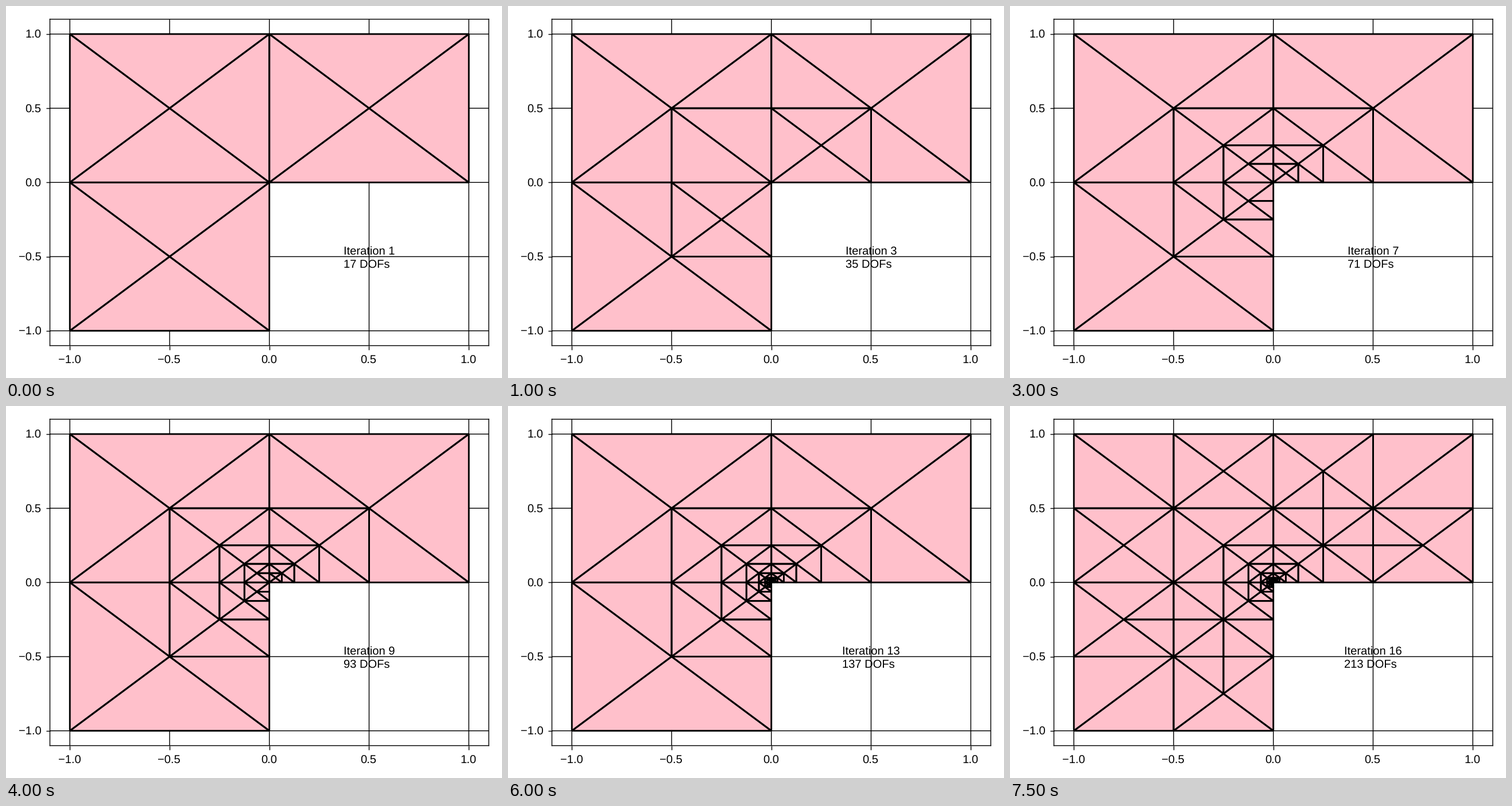
Write a matplotlib script that moves like this. It is 864 by 648 pixels and loops after 8 s.

```python
"""Adaptive refinement of an L-shaped mesh by newest vertex bisection."""
import matplotlib.pyplot as plt
from matplotlib.animation import FuncAnimation
from matplotlib.collections import PolyCollection

W, H = 864, 648
LEFT, RIGHT, TOP, BOTTOM = 76.5, 840.96, 23.04, 591.6
LIM = 1.1
FONT = 20.16
THIN, THICK = 1.44, 2.88
STEP_MS = 500

plt.rcParams.update({
    "font.family": "Liberation Sans",
    "font.size": FONT,
    "text.hinting": "no_hinting",
    "path.snap": False,
})

DIRS = {
    "L": (-1, 0), "R": (1, 0), "U": (0, 1), "D": (0, -1),
    "A": (1, 1), "B": (-1, 1), "C": (-1, -1),
}


def near(code):
    """Edge midpoints around the corner: 'L1' is direction L at distance 2**-1."""
    return [(DIRS[c[0]][0] / 2 ** int(c[1]), DIRS[c[0]][1] / 2 ** int(c[1]))
            for c in code.split()]


# Edge midpoints inserted at each iteration, in order of bisection
STEPS = [
    near("L1 R1 D1"),
    near("U1 A2 C2"),
    near("B2 R2 D2"),
    near("L2 U2 A3"),
    near("B3 C3 R3"),
    near("U3 D3 A4"),
]
for k in range(3, 7):
    STEPS.append(near(f"L{k} C{k + 1} R{k + 1}"))
    STEPS.append(near(f"B{k + 1} D{k + 1} U{k + 1} A{k + 2}"))
STEPS[12] += [(1, .5), (-.5, -1)]
STEPS[13] += near("L7") + [(-1, -.5), (.5, 1), (-.5, 1), (-1, .5),
                           (-.25, .75), (-.75, .25)]
STEPS.append(near("C8") + [(.25, .75), (.25, .5), (.75, .25), (.5, .25),
                           (-.75, -.25), (-.5, -.25), (-.25, -.75), (-.25, -.5)])


def square(x, y):
    """Four triangles (apex, base, base) of the unit square at (x, y)."""
    ring = [(x, y), (x + 1, y), (x + 1, y + 1), (x, y + 1)]
    mid = (x + .5, y + .5)
    return [(mid, ring[i], ring[(i + 1) % 4]) for i in range(4)]


def bisect(mesh, m):
    """Split every triangle whose base has the midpoint m."""
    out = []
    for apex, a, b in mesh:
        if (a[0] + b[0], a[1] + b[1]) == (2 * m[0], 2 * m[1]):
            out += [(m, apex, a), (m, b, apex)]
        else:
            out.append((apex, a, b))
    return out


def count_dofs(mesh):
    """Interior vertices plus interior edges (quadratic elements)."""
    verts = {p for t in mesh for p in t}
    edges = {frozenset((t[i], t[i - 1])) for t in mesh for i in range(3)}
    border = 2 * len(edges) - 3 * len(mesh)
    return len(verts) + len(edges) - 2 * border


meshes = [square(-1, 0) + square(0, 0) + square(-1, -1)]
for step in STEPS:
    mesh = meshes[-1]
    for point in step:
        mesh = bisect(mesh, point)
    meshes.append(mesh)


def px(x, y):
    """Data to pixels, with y measured from the top."""
    return (LEFT + (x + LIM) / (2 * LIM) * (RIGHT - LEFT),
            BOTTOM - (y + LIM) / (2 * LIM) * (BOTTOM - TOP))


fig = plt.figure(figsize=(W / 72, H / 72), dpi=72, facecolor="white")
ax = fig.add_axes([LEFT / W, 1 - BOTTOM / H,
                   (RIGHT - LEFT) / W, (BOTTOM - TOP) / H])
ax.set(xlim=(-LIM, LIM), ylim=(-LIM, LIM))
ax.set_axisbelow(True)
ax.grid(color=(0, 0, 0, .12), linewidth=THIN)
for spine in ax.spines.values():
    spine.set_linewidth(THIN)


def label(x, y, text="", ha="left"):
    return fig.text(x / W, 1 - y / H, text, ha=ha, va="baseline", color="black")


ticks = [-1, -.5, 0, .5, 1]
ax.set_xticks(ticks)
ax.set_yticks(ticks)
ax.tick_params(length=7.2, width=THIN, labelbottom=False, labelleft=False)
for t in ticks:
    name = f"{t:.1f}".replace("-", "\u2212")
    x, y = px(t, t)
    label(x - .8, 623, name, "center")
    label(61.3, y + 7.2, name, "right")

ax.fill([-1, 0, 0, 1, 1, -1], [-1, -1, 0, 0, 1, 1],
        color="pink", linewidth=0, zorder=2)
lines = PolyCollection([], facecolors="none", edgecolors="black",
                       linewidths=THICK, joinstyle="bevel", zorder=3)
ax.add_collection(lines, autolim=False)

title = label(0, 433)
dofs = label(0, 456.4)
center = px(.5, -.5)[0]


def update(i):
    lines.set_verts(meshes[i])
    # The block is centred, its lines are left-aligned
    half = FONT * (4.447 + .556 * (i >= 9)) / 2
    for item in (title, dofs):
        item.set_x((center - half) / W)
    title.set_text(f"Iteration {i + 1}")
    dofs.set_text(f"{count_dofs(meshes[i])} DOFs")
    return lines, title, dofs


anim = FuncAnimation(fig, update, frames=len(meshes), interval=STEP_MS,
                     repeat=True, repeat_delay=0)
plt.show()
```
